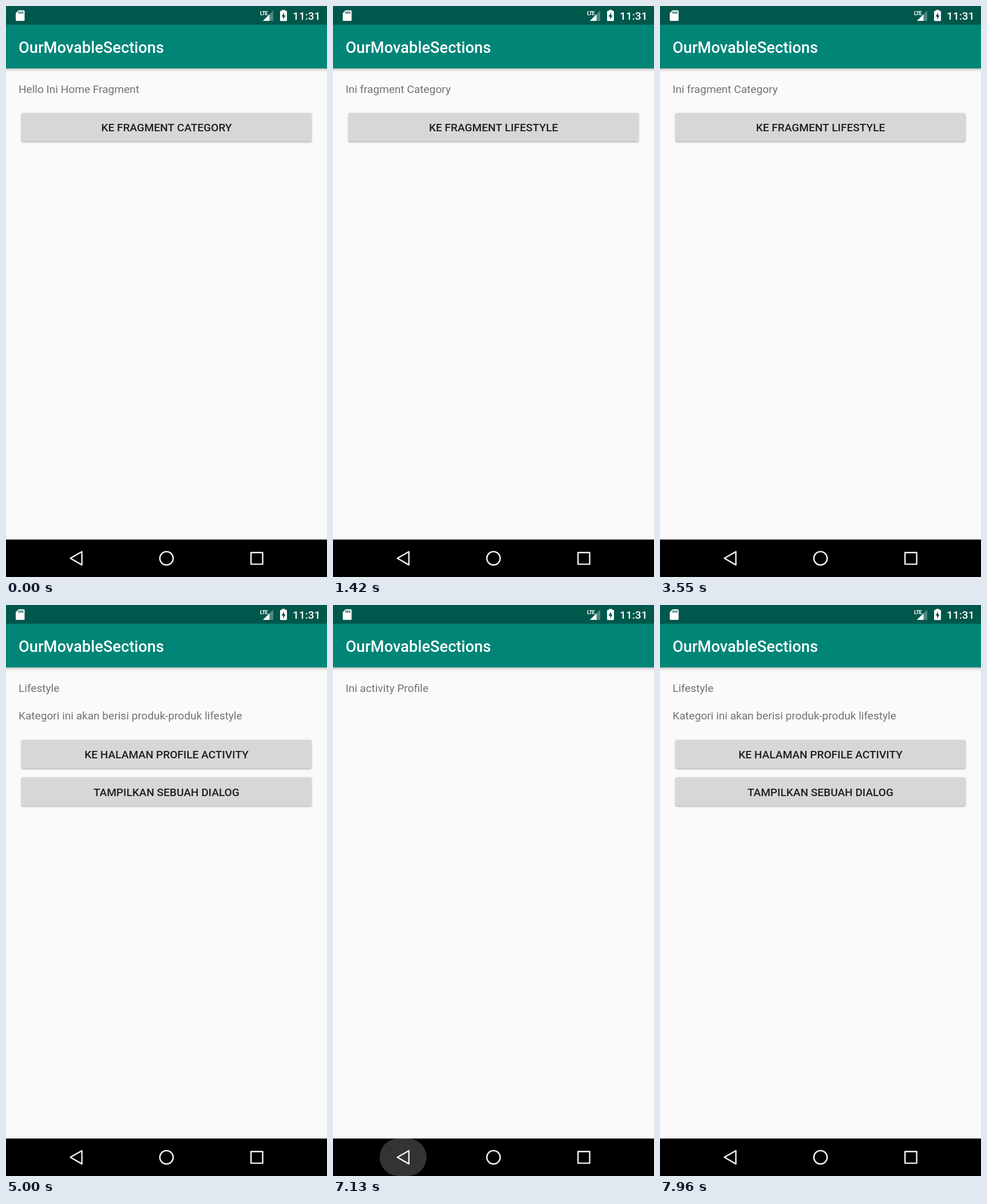
Write an HTML page with a canvas that moves like this. It is 561 px wide and 998 px high and loops after 8 s.

```html
<!DOCTYPE html>
<html lang="id">
<head>
<meta charset="utf-8">
<title>Fragment navigation</title>
<style>
html, body { margin: 0; width: 100%; height: 100%; overflow: hidden; background: #000; }
canvas { display: block; width: 561px; height: 998px; }
</style>
</head>
<body>
<canvas id="stage" width="561" height="998"></canvas>
<script>
const W = 561, H = 998, LOOP = 8000;
const STATUS_H = 32.7, BAR_BOTTOM = 109, NAV_TOP = 932.5;
const SLIDE = H * 0.08;
const FONT = 'Roboto, "Noto Sans", sans-serif';
const TIMES = { category: 1300, lifestyle: 4150, open: 5814, back: 7000, release: 7250, close: 7290 };

const SCREENS = {
  home: {
    texts: [['Hello Ini Home Fragment', 151.8]],
    buttons: [['KE FRAGMENT CATEGORY', 187]]
  },
  category: {
    texts: [['Ini fragment Category', 151.8]],
    buttons: [['KE FRAGMENT LIFESTYLE', 187]]
  },
  lifestyle: {
    texts: [['Lifestyle', 151.8], ['Kategori ini akan berisi produk-produk lifestyle', 200]],
    buttons: [['KE HALAMAN PROFILE ACTIVITY', 235.8], ['TAMPILKAN SEBUAH DIALOG', 301.3]]
  },
  profile: { texts: [['Ini activity Profile', 151.8]], buttons: [] }
};

const ctx = document.getElementById('stage').getContext('2d');
const layer = document.createElement('canvas');
layer.width = W;
layer.height = H;
const lc = layer.getContext('2d');

const clamp = v => Math.min(1, Math.max(0, v));
const progress = (t, start, length) => clamp((t - start) / length);
const easeOut = (p, power) => 1 - Math.pow(1 - p, power);

function rect(c, color, x, y, w, h) {
  c.fillStyle = color;
  c.fillRect(x, y, w, h);
}

function text(c, str, x, y, size, weight, color, align = 'left') {
  c.font = `${weight} ${size}px ${FONT}`;
  c.textAlign = align;
  c.fillStyle = color;
  c.fillText(str, x, y);
}

function polygon(c, points) {
  c.beginPath();
  points.forEach(([x, y]) => c.lineTo(x, y));
  c.closePath();
}

function drawButton(c, [label, y], press) {
  c.save();
  c.shadowColor = 'rgba(0,0,0,0.32)';
  c.shadowBlur = 3 + press * 3;
  c.shadowOffsetY = 1.3 + press * 1.5;
  c.fillStyle = '#d6d7d7';
  c.beginPath();
  c.roundRect(27, y, 507, 49.6, 2.7);
  c.fill();
  c.restore();
  if (press > 0) {
    c.save();
    c.clip();
    c.fillStyle = 'rgba(0,0,0,0.1)';
    c.beginPath();
    c.arc(W / 2, y + 25, 270 * press, 0, Math.PI * 2);
    c.fill();
    c.restore();
  }
  text(c, label, W / 2, y + 32.3, 19.09, 500, '#1f1f1f', 'center');
}

// Paints one whole app window on the layer.
function paintScreen(name, press = 0) {
  const screen = SCREENS[name];
  rect(lc, '#fafafa', 0, 0, W, H);
  const shade = lc.createLinearGradient(0, BAR_BOTTOM, 0, BAR_BOTTOM + 7);
  shade.addColorStop(0, 'rgba(0,0,0,0.26)');
  shade.addColorStop(0.4, 'rgba(0,0,0,0.09)');
  shade.addColorStop(1, 'rgba(0,0,0,0)');
  rect(lc, shade, 0, BAR_BOTTOM, W, 7);
  rect(lc, '#008577', 0, 0, W, BAR_BOTTOM);
  rect(lc, '#00574b', 0, 0, W, STATUS_H);
  rect(lc, '#000', 0, NAV_TOP, W, H - NAV_TOP);
  text(lc, 'OurMovableSections', 22, 81.5, 27.27, 500, '#fff');
  screen.texts.forEach(([str, y]) => text(lc, str, 22, y, 19.09, 400, '#737373'));
  screen.buttons.forEach((b, i) => drawButton(lc, b, i ? 0 : press));
}

function showScreen(name, alpha = 1, dy = 0, press = 0) {
  paintScreen(name, press);
  ctx.globalAlpha = alpha;
  ctx.drawImage(layer, 0, dy);
  ctx.globalAlpha = 1;
}

function drawStatusIcons() {
  // Memory card
  ctx.fillStyle = '#fff';
  ctx.beginPath();
  ctx.moveTo(22, 7.5);
  ctx.lineTo(31, 7.5);
  ctx.quadraticCurveTo(32.5, 7.5, 32.5, 9);
  ctx.lineTo(32.5, 24.5);
  ctx.quadraticCurveTo(32.5, 26, 31, 26);
  ctx.lineTo(18.5, 26);
  ctx.quadraticCurveTo(17, 26, 17, 24.5);
  ctx.lineTo(17, 12.5);
  ctx.fill();
  [22, 25.2, 28.4].forEach(x => rect(ctx, '#00574b', x, 9.5, 1.7, 4));

  // Signal
  polygon(ctx, [[467, 8], [467, 26], [449, 26]]);
  ctx.fillStyle = 'rgba(255,255,255,0.3)';
  ctx.fill();
  polygon(ctx, [[460.5, 14.5], [460.5, 26], [449, 26]]);
  ctx.fillStyle = '#fff';
  ctx.fill();
  ctx.letterSpacing = '-0.8px';
  text(ctx, 'LTE', 444, 15.5, 9.5, 700, '#fff');
  ctx.letterSpacing = '0px';

  // Battery
  rect(ctx, '#fff', 482.3, 6.8, 5.4, 3);
  ctx.beginPath();
  ctx.roundRect(479, 8.6, 12, 17.6, 1.2);
  ctx.fill();
  polygon(ctx, [[486, 11.5], [481.5, 18.4], [484.3, 18.4], [484.3, 23.5], [488.7, 16.5], [486, 16.5]]);
  ctx.fillStyle = '#00574b';
  ctx.fill();

  text(ctx, '11:31', 549.5, 24, 19.09, 500, '#fff', 'right');
}

function drawNavIcons(t) {
  const grow = 1 - Math.pow(400, -1.4 * progress(t, TIMES.back, 250));
  const fade = 1 - progress(t, TIMES.release, 450);
  if (t >= TIMES.back && fade > 0) {
    const half = 41.5 * grow;
    ctx.fillStyle = `rgba(255,255,255,${0.2 * fade})`;
    ctx.beginPath();
    ctx.roundRect(122.5 - half, NAV_TOP, half * 2, H - NAV_TOP, Math.min(half, 32.7));
    ctx.fill();
  }
  ctx.strokeStyle = '#f4f4f4';
  ctx.lineWidth = 2.4;
  ctx.lineJoin = 'round';
  polygon(ctx, [[112.5, 965.3], [132.6, 953.7], [132.6, 976.9]]);
  ctx.stroke();
  ctx.beginPath();
  ctx.arc(280.5, 965.3, 11.7, 0, Math.PI * 2);
  ctx.stroke();
  ctx.strokeRect(428.2, 955.2, 20.4, 20.4);
}

function drawWindows(t) {
  const press = start => easeOut(progress(t, start, 225), 2);
  if (t < TIMES.category) {
    showScreen('home', 1, 0, press(TIMES.category - 150));
  } else if (t < TIMES.lifestyle) {
    showScreen('category', 1, 0, press(TIMES.lifestyle - 150));
  } else if (t < TIMES.open) {
    showScreen('lifestyle', 1, 0, press(TIMES.open - 144));
  } else if (t < TIMES.close) {
    showScreen('lifestyle', 1 - 0.3 * progress(t, TIMES.open, 217));
    const slide = easeOut(progress(t, TIMES.open, 350), 5);
    showScreen('profile', easeOut(progress(t, TIMES.open, 200), 4), SLIDE * (1 - slide));
  } else {
    const p = progress(t, TIMES.close, 250);
    showScreen('lifestyle', 0.7 + 0.3 * p);
    const alpha = 1 - progress(t, TIMES.close + 100, 150);
    if (alpha > 0) showScreen('profile', alpha, SLIDE * Math.pow(p, 4));
  }
}

function frame() {
  const t = performance.now() % LOOP;
  rect(ctx, '#000', 0, 0, W, H);
  drawWindows(t);
  drawStatusIcons();
  drawNavIcons(t);
  requestAnimationFrame(frame);
}
frame();
</script>
</body>
</html>
```
